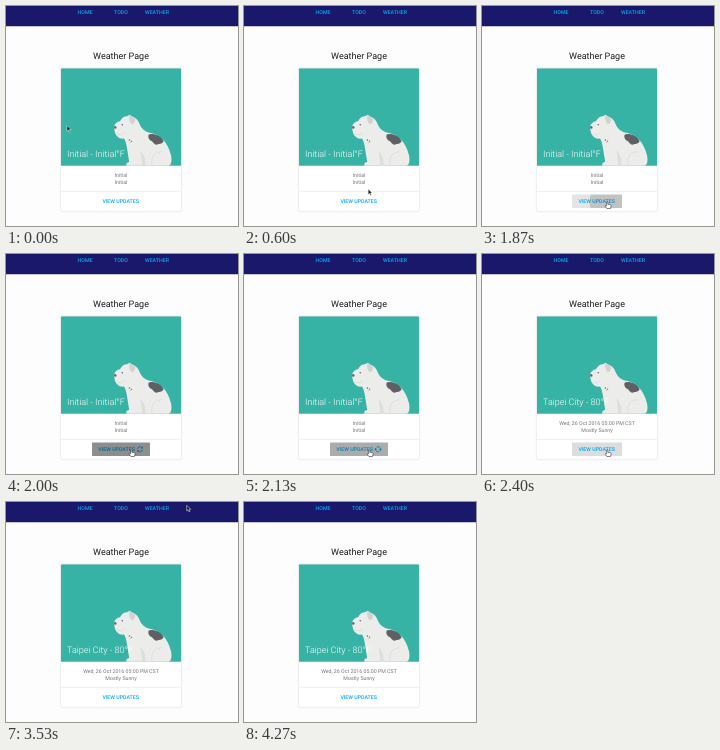
An HTML page for the animation above (4.34 s loop, 232 by 220 pixels).

```html
<!DOCTYPE html>
<html lang="en">
<head>
<meta charset="utf-8">
<title>Weather Page</title>
<style>
  html, body { margin: 0; width: 100%; height: 100%; overflow: hidden; background: #fdfdfd; }
  svg { display: block; width: 232px; height: 220px; }
  text { font: 400 5.25px Roboto, sans-serif; text-rendering: geometricPrecision; text-anchor: middle; }
  .link { font-weight: 500; fill: #03a9f4; }
  .head { font-size: 9px; fill: #1c1c1c; }
  .over { font-size: 9px; font-weight: 300; fill: #fff; text-anchor: start; }
  .note { fill: #757575; }
  .card { filter: drop-shadow(0 .7px .7px rgba(0,0,0,.34)) drop-shadow(0 .2px .8px rgba(0,0,0,.16)); }
  .bar { filter: drop-shadow(0 .5px .6px rgba(0,0,0,.25)); }
</style>
</head>
<body>
<svg viewBox="0 0 232 220">
  <defs>
    <clipPath id="edge"><rect id="edgeBox" y="188.4" height="13.6" rx=".7"/></clipPath>
  </defs>
  <rect width="232" height="220" fill="#fdfdfd"/>
  <rect class="bar" y="-4" width="232" height="24.2" fill="#1a186a"/>
  <text class="link" x="79" y="8.1">HOME</text>
  <text class="link" x="115" y="8.1">TODO</text>
  <text class="link" x="151" y="8.1">WEATHER</text>
  <text class="head" x="115" y="53.4">Weather Page</text>

  <rect class="card" x="55" y="62.6" width="120" height="142.4" rx=".75" fill="#fff"/>
  <path d="M55 159.7V63.3q0-.7.7-.7h118.6q.7 0 .7.7v96.4z" fill="#37b3a5"/>

  <g id="dog">
    <path fill="#ececeb" d="M108.2 122C108 118 110.5 116 114 115.2C115.5 112 118 110.3 121 110.2
      L123.5 108.8L126.5 110.8C130.5 111.8 132.5 115 134 119C136.5 124 140 126 146 127.3
      C155 129 162 137.5 164.6 148C166.4 153.5 165.6 159.7 162 159.7H120.5C119.6 157.6 121 156.3 123.2 156
      C122.4 150 121.4 145 120.6 140C120 137 119.3 134.5 118 132.6C112 133.2 108.5 129 108.2 122Z"/>
    <path fill="#dededd" d="M134 144C135.5 149 136 154 136.2 159.7H139.5C140 155 139 149 134 144Z"/>
    <path fill="none" stroke="#d5d5d4" stroke-width=".6" d="M146 159C144.5 151 149 145 156 146M111 127.5C114 129.8 117 129 118.5 126"/>
    <path fill="#d3d2d1" d="M123.5 108.8L129 112.2C129.6 115.6 128 118 125.6 118.2C123.2 115.5 122.6 112 123.5 108.8Z"/>
    <path fill="#5e6061" d="M142.8 128.6C145 126.8 155.5 128.6 157.6 135.2C156 138.8 152.8 137.2 150.8 138.8C147.6 138.6 147.2 135.4 144.8 134.8C142.6 133.4 141.6 130.4 142.8 128.6Z"/>
    <g fill="#66686a">
      <ellipse cx="109.3" cy="121.4" rx="1.2" ry="1.4"/>
      <circle cx="116.3" cy="118.8" r=".8"/>
      <circle cx="123.4" cy="134" r=".7"/>
      <circle cx="125.6" cy="135.2" r=".6"/>
      <circle cx="124.2" cy="136.6" r=".45"/>
    </g>
  </g>

  <text class="over" id="place" x="61" y="151.2"></text>
  <text class="note" id="line1" x="115" y="171.1"></text>
  <text class="note" id="line2" x="115" y="177.8"></text>
  <path d="M55 185.4h120" stroke="#e4e4e4" stroke-width=".6"/>

  <rect id="fill" y="188.4" height="13.6" rx=".7" fill="#e4e4e4"/>
  <text class="link" id="label" y="197.2">VIEW UPDATES</text>
  <g id="spin" fill="none" stroke="#03a9f4" stroke-width=".85">
    <path d="M-2.5-.5A2.55 2.55 0 0 1 1.7-1.9M2.5.5A2.55 2.55 0 0 1-1.7 1.9"/>
    <path fill="#03a9f4" stroke="none" d="M2.8-3v2.3H.5zM-2.8 3V.7H-.5z"/>
  </g>
  <circle id="ripple" cx="125.3" cy="195.6" clip-path="url(#edge)"/>

  <g id="arrow" stroke="#fff" stroke-width=".5" stroke-linejoin="round">
    <path fill="#111" d="M0 0V5.6L1.3 4.4L2.2 6.5L3.2 6.1L2.3 4H4z"/>
  </g>
  <g id="hand" stroke="#222" stroke-width=".55" stroke-linejoin="round">
    <path fill="#fff" d="M-.6.5Q0-.4.6.5V2.6L3.4 3.2Q4 3.5 3.8 4.4L3.2 6.9H-.4L-2.3 4.3Q-2.1 3.3-.6 4.2z"/>
  </g>
</svg>
<script>
const LOOP = 4340, TICK = 200 / 3;
const $ = id => document.getElementById(id);
const set = (id, attrs) => { for (const k in attrs) $(id).setAttribute(k, attrs[k]); };
const show = (id, on) => { $(id).style.display = on ? "" : "none"; };

const before = ["Initial - Initial°F", "Initial", "Initial"];
const after = ["Taipei City - 80°F", "Wed, 26 Oct 2016 05:00 PM CST", "Mostly Sunny"];

// time, x, y of the pointer tip
const path = [
  [67, 61, 119.6], [600, 124.2, 183], [1200, 125.3, 195.6],
  [3134, 125.3, 195.6], [3600, 184, -8]
];
// time, opacity of the ripple
const shade = [[1800, 0], [1934, .3], [2000, .38], [2200, .18], [2400, .03], [2667, 0]];

const smooth = p => p * p * (3 - 2 * p);
const linear = p => p;

function at(keys, t, ease) {
  if (t <= keys[0][0]) return keys[0].slice(1);
  for (let i = 1; i < keys.length; i++) {
    const a = keys[i - 1], b = keys[i];
    if (t <= b[0]) {
      const p = ease((t - a[0]) / (b[0] - a[0]));
      return a.slice(1).map((v, j) => v + (b[j + 1] - v) * p);
    }
  }
  return keys[keys.length - 1].slice(1);
}

function draw(now) {
  const t = Math.floor((now % LOOP + 4) / TICK) * TICK;
  const [x, y] = at(path, t, smooth);
  const busy = t > 1930 && t < 2260;
  const over = y > 188.4 && y < 202 && x > 90 && x < 140;

  (t < 2260 ? before : after).forEach((s, i) => {
    $(["place", "line1", "line2"][i]).textContent = s;
  });

  const box = busy ? { x: 86, width: 58 } : { x: 90, width: 50 };
  set("fill", box);
  set("edgeBox", box);
  show("fill", over);
  set("label", { x: busy ? 110.6 : 114.7 });
  show("spin", busy);
  set("spin", { transform: `translate(134 195.3) rotate(${(t - 2000) * .36})` });

  const grow = Math.min(1, Math.max(0, (t - 1800) / 180));
  set("ripple", { r: 48 * grow, opacity: at(shade, t, linear)[0] });

  const spot = { transform: `translate(${x} ${y})` };
  set("arrow", spot);
  set("hand", spot);
  show("arrow", !over && t < 3590);
  show("hand", over);
}

const start = performance.now();
function tick() {
  draw(performance.now() - start);
  requestAnimationFrame(tick);
}
tick();
</script>
</body>
</html>
```
